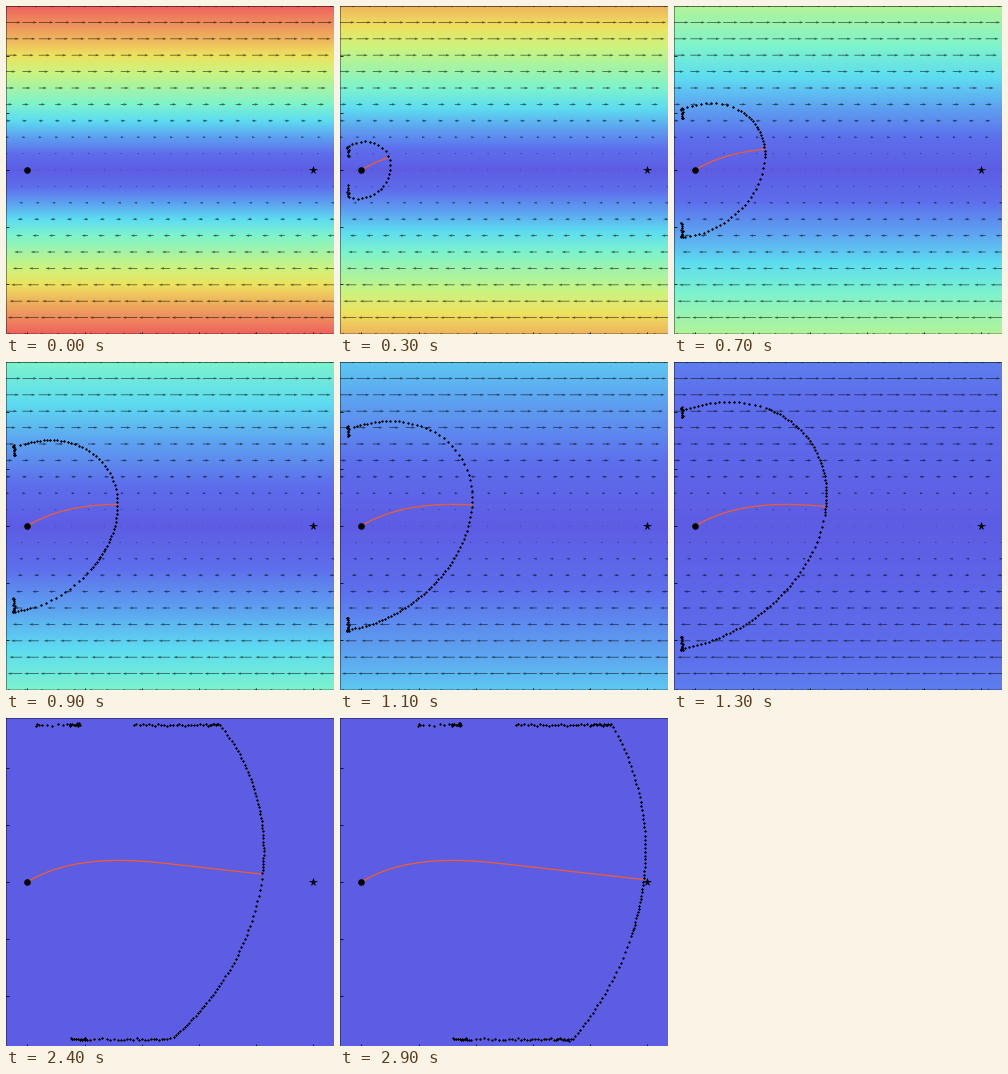
Recreate the animation shown at these times as a matplotlib script. Size 328 by 328 pixels, loop 3 s.

```python
import numpy as np
import matplotlib.pyplot as plt
from matplotlib.animation import FuncAnimation
from matplotlib.colors import LinearSegmentedColormap

SIZE, DPI = 328, 64
PT = 72 / DPI                      # points per pixel
FRAMES, SUB = 30, 10
MID = SIZE / 2
UNIT = 57.2                        # pixels per axis unit
SPEED = UNIT / 6                   # pixels per frame
START_X, GOAL_X = 21.4, 21.4 + 5 * UNIT
WALL_X, WALL_Y = 8, 157.3
SHEAR, CALM = 0.0997, 15           # initial wind shear, frame when wind dies
BEST_SLOPE = 0.635
COARSE, FINE, MAX_GAP = 40, 32, 6


def strength(t):
    return max(0.0, 1 - t / CALM)


def simulate():
    """Positions of all rays; the last one is the optimal route."""
    n = COARSE * FINE
    angle = np.append(np.arange(n) * 2 * np.pi / n, np.arctan(BEST_SLOPE))
    px, py = np.cos(angle), np.sin(angle)
    x, y = np.full(n + 1, START_X), np.zeros(n + 1)
    stuck = np.zeros(n + 1, bool)
    xs, ys, walls = [x.copy()], [y.copy()], [stuck.copy()]
    dt = 1 / SUB
    for k in range((FRAMES - 1) * SUB):
        wind = np.where(stuck, 0, SHEAR * strength((k + 0.5) * dt))
        py = py - wind * px * dt
        norm = np.hypot(px, py)
        x = x + (SPEED * px / norm + wind * y) * dt
        y = y + SPEED * py / norm * dt

        # rays that meet a wall slide along it and turn at the corners
        high = np.abs(y) > WALL_Y
        px = np.where(high, np.where(px >= 0, 1, -1), px)
        py = np.where(high, 0, py)
        y = np.clip(y, -WALL_Y, WALL_Y)
        left = x < WALL_X
        corner = np.abs(y) >= WALL_Y
        px = np.where(left, np.where(corner, 1, 0), px)
        py = np.where(left, np.where(corner, 0, np.sign(py)), py)
        x = np.maximum(x, WALL_X)
        stuck = stuck | high | left

        xs.append(x)
        ys.append(y)
        walls.append(stuck)
    return np.array(xs), np.array(ys), np.array(walls)


def refine(active, x, y):
    """Add a ray wherever two neighbours have drifted too far apart."""
    n = COARSE * FINE
    nxt = np.append(active[1:], active[0] + n)
    gap = np.hypot(x[nxt % n] - x[active], y[nxt % n] - y[active])
    split = (gap > MAX_GAP) & (nxt - active > 1)
    return np.unique(np.append(active, (active[split] + nxt[split]) // 2))


def build_fronts(xs, ys, walls):
    rng = np.random.default_rng(4)
    jitter = rng.normal(0, 0.6, COARSE * FINE)
    active = np.arange(0, COARSE * FINE, FINE)
    fronts = []
    for f in range(FRAMES):
        x, y, wall = xs[f * SUB], ys[f * SUB], walls[f * SUB]
        active = refine(active, x, y)
        fx, fy, j = x[active], y[active], jitter[active] * wall[active]
        flat = np.abs(fy) >= WALL_Y
        fronts.append((fx + np.where(flat, 0, j), MID - fy + np.where(flat, j, 0)))
    return fronts


xs, ys, walls = simulate()
fronts = build_fronts(xs, ys, walls)
route_x, route_y = xs[:, -1], MID - ys[:, -1]

fig = plt.figure(figsize=(SIZE / DPI, SIZE / DPI), dpi=DPI)
ax = fig.add_axes([0, 0, 1, 1])
ax.set_xticks(START_X + UNIT * np.arange(6))
ax.set_yticks(MID + UNIT * np.arange(-2, 3))
ax.tick_params(direction="in", length=2.5 * PT, width=0.8 * PT,
               labelbottom=False, labelleft=False)
for spine in ax.spines.values():
    spine.set(linewidth=PT, alpha=0.4)

colors = [(93, 93, 228), (93, 110, 236), (93, 160, 240), (93, 220, 240),
          (125, 243, 205), (165, 243, 165), (205, 243, 125), (238, 225, 95),
          (238, 180, 93), (238, 140, 93), (238, 98, 93)]
cmap = LinearSegmentedColormap.from_list("wind", np.array(colors) / 255, N=512)
level = np.abs(np.arange(SIZE) + 0.5 - MID)[:, None] / MID
field = ax.imshow(level, cmap=cmap, vmin=0, vmax=1, aspect="auto",
                  extent=(0, SIZE, SIZE, 0), interpolation="nearest", zorder=0)

gx, gy = np.meshgrid(np.linspace(0, SIZE, 21), np.linspace(0, SIZE, 21))
arrows = ax.quiver(gx, gy, 0.1 * (MID - gy), 0 * gy, angles="xy",
                   scale_units="xy", scale=1, units="dots", width=0.8,
                   color="black", alpha=0.6, zorder=1)

route, = ax.plot([], [], color="#ec5c38", lw=1.3 * PT, zorder=3)
front, = ax.plot([], [], "D", color="black", ms=2.1 * PT, mew=0, zorder=4)
ax.plot([START_X], [MID], "o", color="black", ms=6.6 * PT, mew=0, zorder=5)
ax.plot([GOAL_X], [MID], "*", color="black", ms=7.5 * PT, mew=0.5 * PT, zorder=5)
ax.set_xlim(0, SIZE)
ax.set_ylim(SIZE, 0)


def draw(f):
    wind = strength(f)
    field.set_data(level * wind)
    arrows.set_visible(wind > 0)
    end = f * SUB + 1
    route.set_data(route_x[:end], route_y[:end])
    front.set_data(*fronts[f])
    return field, arrows, route, front


anim = FuncAnimation(fig, draw, frames=FRAMES, interval=100, repeat=True)
plt.show()
```
